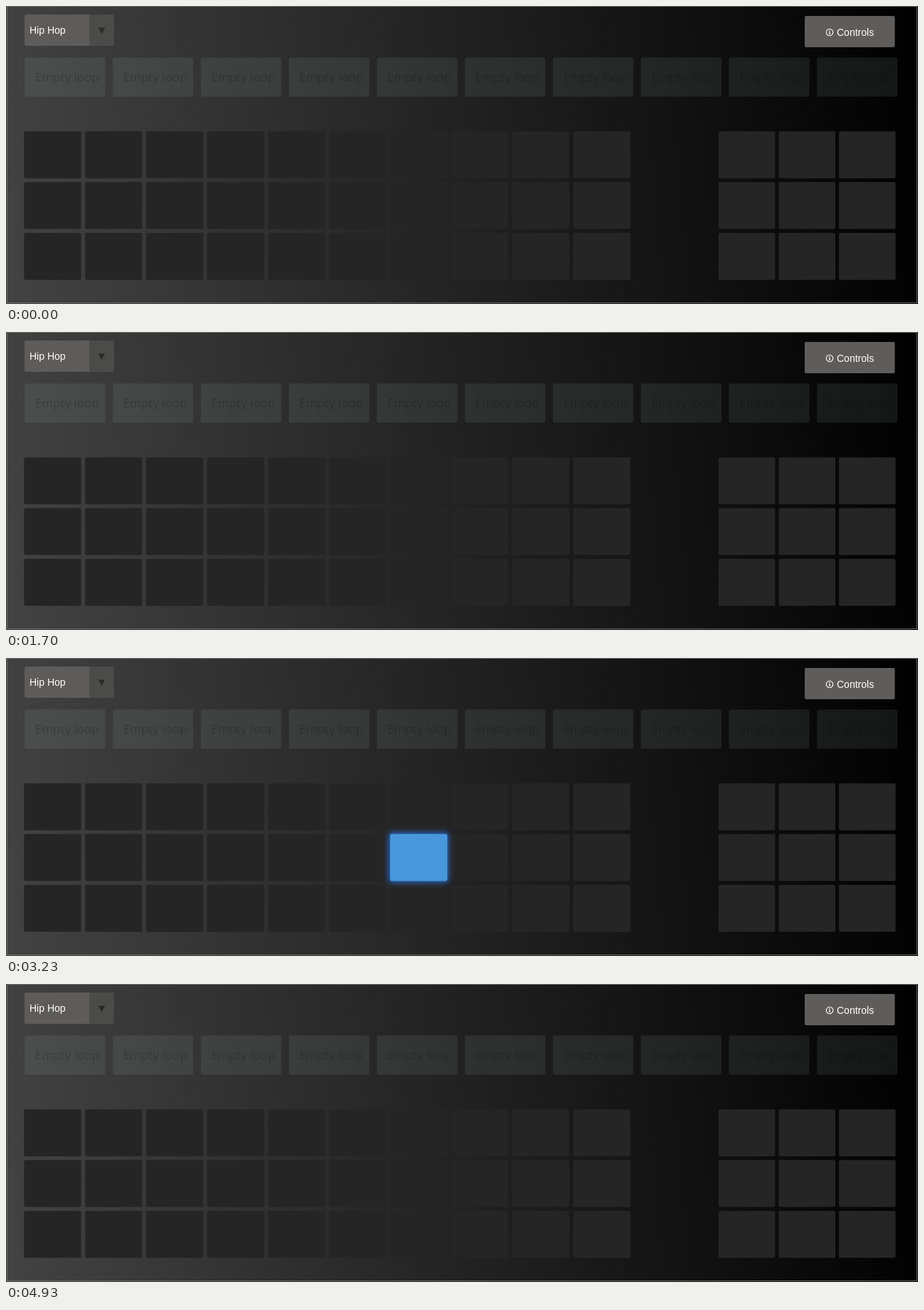
Write an HTML page that moves like this. It is 1280 px wide and 419 px high and loops after 6290 ms.

```html
<!DOCTYPE html>
<html lang="en">
<head>
<meta charset="utf-8">
<title>Drum pads</title>
<style>
  html, body { margin: 0; width: 100%; height: 100%; overflow: hidden; background: #000; }
  svg { display: block; width: 100%; height: 100%; }
  .ui { font: 14px "Liberation Sans", Arial, sans-serif; fill: #fff; }
  .loop { font: 17px "Open Sans", sans-serif; fill: #000; fill-opacity: .2; text-anchor: middle; }
</style>
</head>
<body>
<svg id="stage" viewBox="0 0 1280 419">
  <defs>
    <linearGradient id="shade" gradientUnits="userSpaceOnUse" x1="-18" y1="274" x2="1298" y2="145">
      <stop offset="0" stop-color="#434343"/>
      <stop offset="1" stop-color="#000"/>
    </linearGradient>
    <filter id="blur" x="-30%" y="-30%" width="160%" height="160%">
      <feGaussianBlur stdDeviation="4"/>
    </filter>
  </defs>
  <rect width="1280" height="419" fill="url(#shade)"/>
  <rect x="1.5" y=".5" width="1277" height="417" fill="none" stroke="#6c6c6c"/>

  <rect x="26" y="12" width="125.5" height="44" rx="2" fill="#4b4b4a"/>
  <path d="M28 12H117V56H28a2 2 0 0 1-2-2V14a2 2 0 0 1 2-2Z" fill="#5d5c5b"/>
  <text class="ui" x="33" y="39">Hip Hop</text>
  <path d="M129.5 30.5h9.5l-4.75 8.5Z" fill="#292929"/>

  <rect x="1121" y="14" width="126.5" height="44" rx="2" fill="#5e5d5c"/>
  <circle cx="1156" cy="37" r="4.7" fill="none" stroke="#fff" stroke-width="1.1"/>
  <path d="M1156 34v1.4M1156 36.3v3.7" stroke="#fff" stroke-width="1.4"/>
  <text class="ui" x="1166" y="42">Controls</text>

  <g id="loops"></g>
  <g id="pads"></g>
  <g id="lit" visibility="hidden">
    <rect x="-1.5" y="-1.5" width="83" height="69" rx="3" fill="#2c6fdc" filter="url(#blur)"/>
    <rect width="80.2" height="66" rx="2" fill="#4a98dc"/>
  </g>
</svg>
<script>
const LOOP_MS = 6290, STEP_MS = 170;
// Pad presses: start time, column, row
const presses = [
  [1360, 1, 1],
  [2210, 2, 2],
  [2890, 9, 1],
  [3230, 6, 1],
  [3910, 0, 1]
];
const byId = id => document.getElementById(id);
const lit = byId("lit");

function add(parent, tag, attrs, text = "") {
  const node = document.createElementNS("http://www.w3.org/2000/svg", tag);
  for (const key in attrs) node.setAttribute(key, attrs[key]);
  node.textContent = text;
  byId(parent).appendChild(node);
}

const padX = col => col < 10 ? 25.3 + 85.64 * col : 1000 + 84.5 * (col - 10);
const padY = row => 176.3 + 71.3 * row;

for (let i = 0; i < 10; i++) {
  const x = 26.3 + 123.55 * i;
  add("loops", "rect", { x, y: 72.5, width: 113, height: 55, rx: 2, fill: "#aaacb0", "fill-opacity": .115 });
  add("loops", "text", { class: "loop", x: x + 59.5, y: 106 }, "Empty loop");
}
for (let row = 0; row < 3; row++)
  for (let col = 0; col < 13; col++)
    add("pads", "rect", { x: padX(col), y: padY(row), width: col < 10 ? 80.2 : 79.5, height: 66, rx: 2, fill: "#252526" });

function draw(ms) {
  const press = presses.find(([start]) => ms >= start && ms < start + STEP_MS);
  lit.setAttribute("visibility", press ? "visible" : "hidden");
  if (press) lit.setAttribute("transform", `translate(${padX(press[1])} ${padY(press[2])})`);
}

const begin = performance.now();
function tick() {
  draw((performance.now() - begin) % LOOP_MS);
  requestAnimationFrame(tick);
}
tick();
</script>
</body>
</html>
```
